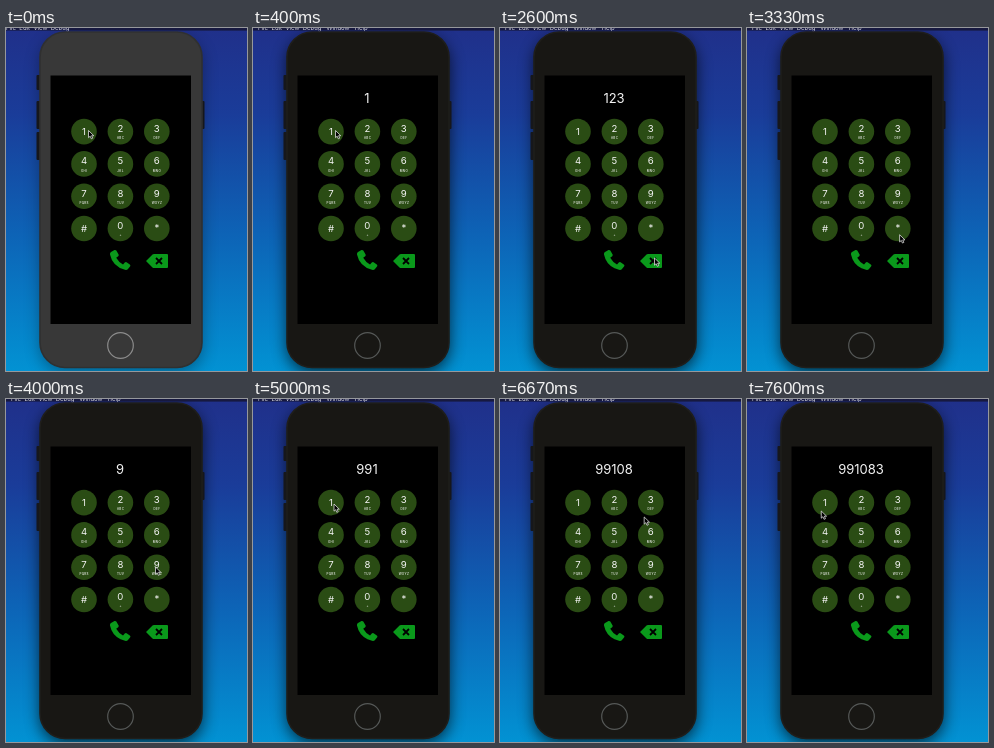
These frames come from a looping animation (241x343 px, 8000 ms). An HTML page:

```html
<!DOCTYPE html>
<html lang="en">
<head>
<meta charset="utf-8">
<title>Phone keypad</title>
<style>
  html, body { margin: 0; width: 100%; height: 100%; overflow: hidden; background: #1b2f8d; }
  svg { display: block; width: 100vw; height: 100vh; }
  text { font-family: Inter, "Liberation Sans", sans-serif; fill: #f4f4f4; text-anchor: middle; }
  .digit { font-size: 9.6px; }
  .letters { font-size: 3px; font-weight: 500; letter-spacing: .3px; }
  .display { font-size: 13px; }
  .menu { font-size: 6px; text-anchor: start; fill: #d4d5e0; white-space: pre; }
</style>
</head>
<body>
<svg viewBox="0 0 241 343">
  <defs>
    <linearGradient id="sky" x1="0" y1="0" x2="0" y2="1">
      <stop offset="0" stop-color="#20308a"/>
      <stop offset=".25" stop-color="#1a3c99"/>
      <stop offset=".6" stop-color="#0d63b6"/>
      <stop offset="1" stop-color="#0292d3"/>
    </linearGradient>
    <filter id="blur" x="-30%" y="-20%" width="160%" height="140%">
      <feGaussianBlur stdDeviation="8"/>
    </filter>
  </defs>
  <rect width="241" height="343" fill="url(#sky)"/>
  <rect id="shadow" x="34" y="9" width="162.5" height="336" rx="26" filter="url(#blur)"/>
  <rect width="241" height="2.6" fill="#17193f"/>
  <text id="menu" class="menu" y="1.6"></text>

  <g fill="#16171b">
    <rect x="30.5" y="47" width="5" height="15" rx="1"/>
    <rect x="30.5" y="73" width="5" height="28" rx="1"/>
    <rect x="30.5" y="104" width="5" height="28" rx="1"/>
    <rect x="194" y="73" width="4.5" height="28" rx="1"/>
  </g>
  <rect id="body" x="34" y="4" width="162" height="335.5" rx="25" stroke-width="1.6"/>
  <rect x="44.5" y="47.5" width="140.5" height="248.5"/>
  <circle id="home" cx="114.5" cy="317.5" r="12.8" fill="none" stroke-width="1.2"/>

  <g id="keys"></g>
  <g fill="#0a991b">
    <path d="M105 224L108.5 222Q109.6 221.6 110.3 222.6L112.6 226.4Q113 227.5 112.2 228.2L110.2 229.8Q112.5 234 117 236.4L118.8 234.4Q119.6 233.6 120.6 234.2L123.8 236.4Q124.8 237.3 124.2 238.3L122 241Q121 242.2 119 241.8Q106.5 238.5 104 226.5Q103.8 224.8 105 224Z"/>
    <path d="M140 233L146.5 226.6Q147 226 148 226H161Q162 226 162 227V239Q162 240 161 240H148Q147 240 146.5 239.4Z"/>
  </g>
  <path d="M150 230l6 6m0-6l-6 6" stroke="#000" stroke-width="1.8"/>
  <text id="display" class="display" x="114" y="75"></text>
  <path id="cursor" d="M0 0V7.2L1.7 5.7L2.8 8.3L4.2 7.7L3.1 5.2H5.3Z" stroke="#e8e8e8" stroke-width=".75" stroke-linejoin="round"/>
</svg>
<script>
const LOOP = 8000, FPS = 15, ACTIVATE = 330, DELETE = "<";
const byId = id => document.getElementById(id);
const [menu, shadow, body, home, display, cursor] =
  ["menu", "shadow", "body", "home", "display", "cursor"].map(byId);

const labels = ["1", "2 ABC", "3 DEF", "4 GHI", "5 JKL", "6 MNO", "7 PQRS", "8 TUV", "9 WXYZ", "#", "0 +", "*"];
byId("keys").innerHTML = labels.map((label, i) => {
  const x = 78 + (i % 3) * 36.4, y = 103.6 + Math.floor(i / 3) * 32.3;
  const [digit, letters] = label.split(" ");
  const baseline = y + (letters ? .4 : digit === "*" ? 2.4 : 3.3);
  return `<circle cx="${x}" cy="${y}" r="12.8" fill="#2a4c14"/>
    <text class="digit" x="${x}" y="${baseline}">${digit}</text>
    ${letters ? `<text class="letters" x="${x + .15}" y="${y + 7.6}">${letters}</text>` : ""}`;
}).join("");

const presses = [
  ["1", 330], ["2", 1000], ["3", 1730],
  [DELETE, 2800], [DELETE, 3000], [DELETE, 3130],
  ["9", 4000], ["9", 4200], ["1", 5000], ["0", 5670], ["8", 6400], ["3", 7070]
];

// Each stop: departure time towards it and where the cursor tip rests.
const home0 = [82.5, 102.5];
const stops = [
  [400, 105, 105], [1200, 144.5, 105], [1900, 154.5, 230],
  [3270, 149.5, 168], [4200, 81, 105], [5130, 112, 199],
  [5800, 112, 168], [6430, 148, 112], [7200, 74, 112]
];

const easeOut = p => 1 - (1 - Math.min(1, Math.max(0, p))) ** 3;

// Longer trips take longer.
function cursorAt(t) {
  let [x, y] = home0;
  for (const [depart, toX, toY] of stops) {
    if (t < depart) break;
    const dx = toX - x, dy = toY - y;
    const e = easeOut((t - depart) / (250 + 3 * Math.hypot(dx, dy)));
    x += dx * e;
    y += dy * e;
  }
  return [x, y];
}

const numberAt = t => presses
  .filter(([, at]) => at <= t + 4)
  .reduce((text, [key]) => key === DELETE ? text.slice(0, -1) : text + key, "");

function draw(time) {
  const t = Math.floor((time % LOOP) * FPS / 1000 + .08) * 1000 / FPS;
  const active = t >= ACTIVATE;
  body.setAttribute("fill", active ? "#181714" : "#383838");
  body.setAttribute("stroke", active ? "#1f1e1b" : "#303030");
  home.setAttribute("stroke", active ? "#555857" : "#8b8b8b");
  shadow.setAttribute("opacity", active ? .7 : .35);
  menu.textContent = active ? "   File  Edit  View  Debug   Window   Help" : "File  Edit  View  Debug";
  display.textContent = numberAt(t);
  cursor.setAttribute("transform", `translate(${cursorAt(t)})`);
}

const start = performance.now();
function tick() {
  draw(performance.now() - start);
  requestAnimationFrame(tick);
}
tick();
</script>
</body>
</html>
```
